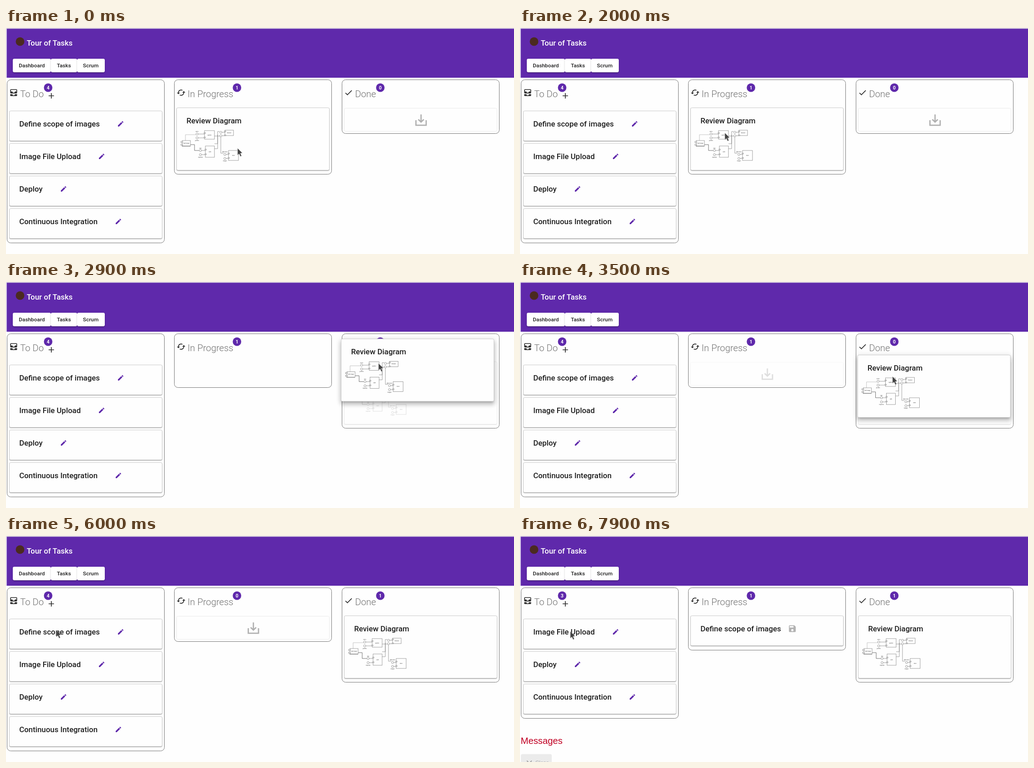
Animation, 1121 px wide and 500 px high, one loop 8 s. Source, as an HTML page:

```html
<!DOCTYPE html>
<html lang="en">
<head>
<meta charset="utf-8">
<title>Task board</title>
<style>
  html, body { margin: 0; width: 100%; height: 100%; overflow: hidden; background: #fefefe; }
  #stage { position: absolute; left: 0; top: 0; width: 1121px; height: 500px; overflow: hidden;
    font-family: Roboto, sans-serif; color: #1f1f1f; --brand: #5f29ab; }
  #stage > * { position: absolute; box-sizing: border-box; }
  #base, #cursor, #log { left: 0; top: 0; overflow: visible; }
  .nav { left: 15px; top: 68px; display: flex; }
  .btn { height: 30px; padding: 0 13.3px; border-radius: 3.4px; background: #fff;
    font: 500 11.83px/30px Roboto, sans-serif;
    box-shadow: 0 2.5px 1px -1.7px #0003, 0 1.7px 1.7px #00000024, 0 1px 4px #0000001f; }
  .col { top: 114px; width: 348px; border: 1px solid #757575; border-radius: 8.5px; }
  .card, .empty { left: 0; top: 0; width: 338px; border: 1px solid #ccc; border-radius: 3.4px; background: #fefefe; }
  .card { height: 67px;
    box-shadow: 0 1.7px 1px -1px #0003, 0 1px 1px #00000024, 0 1px 2.5px #0000001f; }
  .card.tall { height: 139px; }
  .card.lift { box-shadow: 0 4px 4px -2.5px #0003, 0 7px 8.5px 1px #00000024, 0 2.5px 12px 2px #0000001f; }
  .empty { height: 52px; border-color: #ebebeb; }
  .empty svg { position: absolute; left: 151.5px; top: 8.5px; }
  .title { position: absolute; left: 21.2px; top: 18.2px; height: 20px; display: flex; align-items: center;
    white-space: nowrap; font: 500 16.9px/20px Roboto, sans-serif; }
  .pencil { margin-left: 38px; }
  .save { margin-left: 14.5px; opacity: 0; }
  .diagram { position: absolute; left: -1px; top: -1px; }
</style>
</head>
<body>
<div id="stage"></div>
<script>
const LINES = {
  check: 'M4 12.7l5 5L20.3 6.3',
  plus: 'M12 5v14M5 12h14',
  cross: 'M5.7 5.7l12.6 12.6m0-12.6L5.7 18.3',
  drop: 'M4 12v8h16v-8M12 3v12m-4.3-4.2L12 15l4.3-4.2'
};
const SOLIDS = {
  inbox: 'M19 3H5a2 2 0 0 0-2 2v7a2 2 0 0 0 2 2h14a2 2 0 0 0 2-2V5a2 2 0 0 0-2-2zm0 6h-4a3 3 0 0 1-6 0H5V5h14zm-4 7h6v3a2 2 0 0 1-2 2H5a2 2 0 0 1-2-2v-3h6a3 3 0 0 0 6 0z',
  loop: 'M19 8l-4 4h3a6 6 0 0 1-8.8 5.3l-1.46 1.46A8 8 0 0 0 20 12h3zM6 12a6 6 0 0 1 8.8-5.3l1.46-1.46A8 8 0 0 0 4 12H1l4 4 4-4z',
  pencil: 'M3 17.25V21h3.75l11-11L14 6.2zM20.7 7a1 1 0 0 0 0-1.4l-2.3-2.3a1 1 0 0 0-1.4 0l-1.9 1.8 3.8 3.8z',
  save: 'M17 3H5a2 2 0 0 0-2 2v14a2 2 0 0 0 2 2h14a2 2 0 0 0 2-2V7zm-5 16a3 3 0 0 1 0-6 3 3 0 0 1 0 6zm3-10H5V5h10z'
};
const INK = '#2b2b2b', BRAND = 'var(--brand)';
const TOP = 176, TODO_TOP = 183, PITCH = 72;
const colX = i => 1.6 + 369.5 * i;
const slotX = i => Math.round(colX(i) + 5);

const stage = document.getElementById('stage');
function add(html) {
  stage.insertAdjacentHTML('beforeend', html);
  return stage.lastElementChild;
}

// Icon centred on cx, cy when nested in another svg
function icon(name, size, color, cx = size / 2, cy = size / 2) {
  const paint = LINES[name] ? `fill="none" stroke="${color}" stroke-width="2"` : `fill="${color}"`;
  return `<svg class="${name}" x="${cx - size / 2}" y="${cy - size / 2}" width="${size}" height="${size}" viewBox="0 0 24 24">
    <path ${paint} d="${LINES[name] || SOLIDS[name]}"/></svg>`;
}
const text = (x, y, size, weight, color, str, extra = '') =>
  `<text x="${x}" y="${y}" font-size="${size}" font-weight="${weight}" fill="${color}" ${extra}>${str}</text>`;
const rect = (x, y, w, h) => `<rect x="${x}" y="${y}" width="${w}" height="${h}" fill="#fefefe"/>`;
const note = (x, y, str) => text(x, y, 2.7, 400, '#444', str, 'stroke="none" text-anchor="middle"');

// Component box with two round ports on its left
function part(x, y, w, h, reach, name, above, below) {
  const cx = x - reach, y1 = y + h * .4, y2 = y1 + 6 + h * .13;
  const port = py => `<path d="M${cx} ${py}H${x}"/><circle cx="${cx}" cy="${py}" r="2.4" fill="#fefefe"/>`;
  return port(y1) + port(y2) + rect(x, y, w, h) + rect(x - 1, y1 - 3, 3, 2) + rect(x - 1, y2 - 2, 3, 2) +
    note(cx, y1 - 4.5, above) + note(cx, y2 + 6.5, below) + note(x + w / 2, y + h / 2 + 1, name);
}
const diagram = () => `<svg class="diagram" width="338" height="138" fill="none" stroke="#777" stroke-width=".7"
    font-family="Liberation Sans, sans-serif">
  <path stroke="#aaa" d="M20 73V60H43"/><path stroke="#333" d="M12 85.5H31M31 82H40V95H50"/>
  <path d="M84 80H91V53H95M91 60V91H84M84 63H98V101H104"/>
  ${rect(13, 73, 18, 12)}${rect(10, 75, 4, 2.5)}${rect(10, 81, 4, 2.5)}${note(22, 80, 'task image')}
  ${part(62, 51, 22, 19, 16.5, 'system', 'users', 'profiles')}${part(64, 85, 20, 25, 11, 'web', 'app', 'requests')}
  ${part(107, 50, 19, 12, 9, 'browser', '', '')}${part(115, 95, 22, 22, 8, 'store', 'data store', 'images')}</svg>`;

const card = (title, tall, cls = '') => add(`<div class="card ${tall ? 'tall' : ''} ${cls}">
  <div class="title">${title}${tall ? '' : icon('pencil', 16, BRAND)}${icon('save', 20, '#b2b2b2')}</div>
  ${tall ? diagram() : ''}</div>`);

// Column heading: icon, name and count badge
const heading = (i, glyph, name, badgeX) => icon(glyph, 20.3, INK, colX(i) + 15.3, 143) +
  text(colX(i) + 29.6, 153.3, 20.28, 300, '#707070', name) +
  `<circle cx="${badgeX}" cy="132" r="9.4" fill="${BRAND}"/>` +
  text(badgeX, 135.8, 10.4, 700, '#fff', '', 'class="count" text-anchor="middle"');

add(`<svg id="base" width="1121" height="500">
  <rect width="1121" height="1.5" fill="#e4e4e4"/>
  <rect x="1.5" y="1.5" width="1120" height="108.5" fill="${BRAND}"/>
  <circle cx="31" cy="30" r="9.5" fill="#4b2a20"/>
  ${text(45.8, 39, 16.9, 500, '#fff', 'Tour of Tasks')}
  ${heading(0, 'inbox', 'To Do', 93)}${icon('plus', 20.3, INK, 100, 150)}
  ${heading(1, 'loop', 'In Progress', 509.7)}${heading(2, 'check', 'Done', 826)}</svg>`);
add(`<div class="nav">${['Dashboard', 'Tasks', 'Scrum'].map(s => `<div class="btn">${s}</div>`).join('')}</div>`);

const log = add(`<svg id="log" width="200" height="120" font-family="Liberation Sans, Arial, sans-serif">
  ${text(1.5, 56.3, 20.28, 400, '#c00023', 'Messages')}
  <rect x="2" y="78.5" width="68" height="30" rx="3.4" fill="#ebebeb"/>
  ${icon('cross', 20.3, '#999', 20.5, 98.5)}${text(33.8, 101, 11.83, 400, '#aaa', 'Close')}</svg>`);

const cols = [0, 1, 2].map(i => add(`<div class="col" style="left:${colX(i)}px"></div>`));
const empties = [1, 2].map(i =>
  add(`<div class="empty" style="transform:translate(${slotX(i)}px,${TOP + 1}px)">${icon('drop', 33.8, '#b0b0b0')}</div>`));
const rest = ['Image File Upload', 'Deploy', 'Continuous Integration'].map(s => card(s));

const drag = (title, tall, from, to, times) =>
  ({ el: card(title, tall), lift: null, title, tall, from, to, ...times });
const review = drag('Review Diagram', true, [slotX(1), TOP], [slotX(2), TOP],
  { press: 2200, over: 2800, release: 3300, done: 3800 });
const scope = drag('Define scope of images', false, [slotX(0), TODO_TOP], [slotX(1), TOP],
  { press: 6150, over: 6500, release: 6800, done: 7000 });
const drags = [review, scope];
drags.forEach(d => { d.lift = card(d.title, d.tall, 'lift'); });
const cursor = add(`<svg id="cursor" width="14" height="22"><path d="M0 0V15.2L3.5 12.2 6.2 18.2 8.8 17 6.2 11.2 10.5 10.6Z"
  fill="#424242" stroke="#ddd" stroke-width=".6"/></svg>`);

// Pointer stops as [arrival ms, x, y]; longer ways take longer
const STOPS = [[0, 511, 266], [200, 511, 261], [500, 497, 226], [700, 499, 194], [1000, 479, 161], [1300, 450, 216],
  [2000, 452, 232], [2600, 748, 199], [2900, 822, 180], [3300, 822, 209], [3900, 893, 228],
  [6000, 111, 208], [6600, 460, 206], [7500, 280, 209], [7900, 111, 211]];
const LAG = 13;

const ramp = (t, a, b) => Math.min(1, Math.max(0, (t - a) / (b - a)));
const mix = (a, b, k) => a.map((v, i) => v + (b[i] - v) * k);
function pointer(t) {
  const i = Math.max(1, STOPS.findIndex(s => s[0] >= t));
  const [, ...a] = STOPS[i - 1], [end, ...b] = STOPS[i];
  const span = 150 + .85 * Math.hypot(b[0] - a[0], b[1] - a[1]);
  return mix(a, b, ramp(t, end - span, end));
}
// A lifted card trails the pointer, then settles into its slot
function liftAt(d, t) {
  const grip = pointer(d.press), tip = pointer(Math.min(t, d.release) - LAG);
  return mix(d.from.map((v, i) => v + tip[i] - grip[i]), d.to, ramp(t, d.release, d.done));
}

const move = (el, [x, y]) => { el.style.transform = `translate(${x}px,${y}px)`; };
const show = (el, on) => { el.style.display = on ? '' : 'none'; };
const part1 = (d, cls) => d.el.querySelector('.' + cls);
const counts = document.querySelectorAll('.count');

function draw(t) {
  for (const d of drags) {
    const held = t > d.press && t < d.done;
    move(d.el, t < d.over ? d.from : d.to);
    d.el.style.opacity = held ? .3 : 1;
    show(d.lift, held);
    move(d.lift, liftAt(d, t));
  }
  const reviewed = t >= review.over, started = t >= scope.over;
  const saved1 = t >= review.done, saved2 = t >= scope.done;

  rest.forEach((el, i) => move(el, [slotX(0), TODO_TOP + PITCH * (started ? i : i + 1)]));
  const ends = [476 - PITCH * started, started ? 253 : reviewed ? 234 : 324, reviewed ? 324 : 234];
  cols.forEach((el, i) => { el.style.height = ends[i] - 114 + 'px'; });
  move(log, [0, ends[0]]);

  show(empties[0], reviewed && !started);
  empties[0].style.opacity = ramp(t, review.release, review.done);
  show(empties[1], !reviewed);
  [4 - saved2, 1 - saved1 + saved2, +saved1].forEach((n, i) => { counts[i].textContent = n; });

  show(part1(scope, 'pencil'), !saved2);
  show(part1(scope, 'save'), saved2);
  for (const d of drags) {
    const age = t - d.done;
    part1(d, 'save').style.opacity = ramp(age, 300, 700) * (1 - ramp(age, 900, 1300)) ** 3;
  }
  move(cursor, pointer(t));
}

// The picture advances in steps of 100 ms
const begin = performance.now();
function tick() {
  draw(Math.floor((performance.now() - begin) % 8000 / 100) * 100);
  requestAnimationFrame(tick);
}
tick();
</script>
</body>
</html>
```
